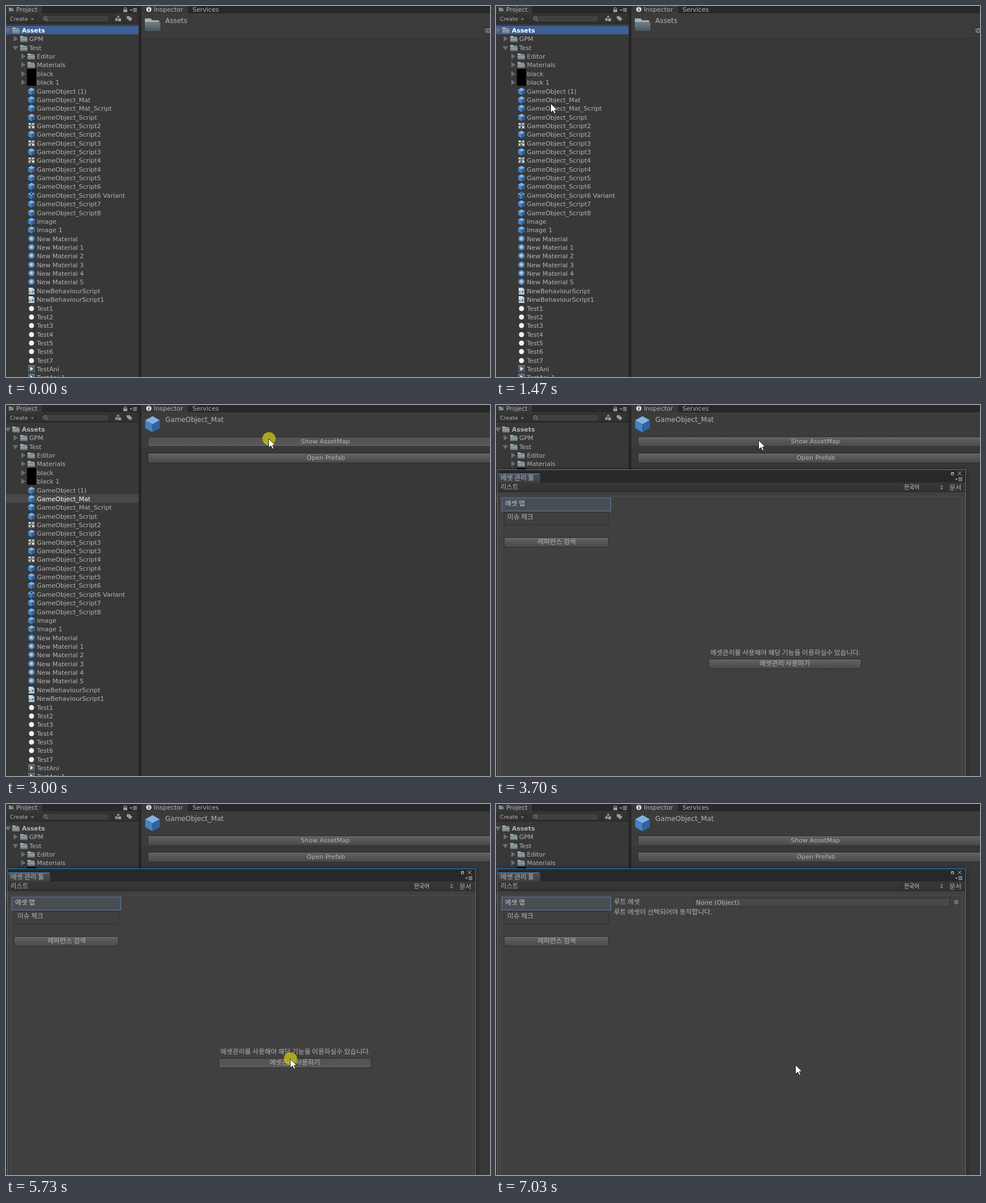
Animation, 854 px wide and 656 px high, one loop 7.49 s. Source, as an HTML page with a canvas:

```html
<!DOCTYPE html>
<html lang="ko">
<head>
<meta charset="utf-8">
<title>Asset window</title>
<style>
html, body { margin: 0; width: 100%; height: 100%; overflow: hidden; background: #383838; }
canvas { display: block; width: 854px; height: 656px; }
</style>
</head>
<body>
<canvas id="stage" width="854" height="656"></canvas>
<script>
const ctx = document.getElementById('stage').getContext('2d');
const LOOP = 7490;
const SANS = 'Verdana, "DejaVu Sans", sans-serif';
const KOREAN = '"Noto Sans CJK KR", "Noto Sans CJK", sans-serif';
const DIALOG = '"Open Sans", "Noto Sans", sans-serif';
const INK = '#b4b4b4';
const DIM = '#9a9a9a';
const ROW = 15.36;

function box(x, y, w, h, fill) {
  ctx.fillStyle = fill;
  ctx.fillRect(x, y, w, h);
}

function frame(x, y, w, h, color) {
  ctx.strokeStyle = color;
  ctx.lineWidth = 1;
  ctx.strokeRect(x + 0.5, y + 0.5, w - 1, h - 1);
}

function poly(points, fill, stroke) {
  ctx.beginPath();
  points.forEach(([x, y]) => ctx.lineTo(x, y));
  ctx.closePath();
  if (fill) { ctx.fillStyle = fill; ctx.fill(); }
  if (stroke) { ctx.strokeStyle = stroke; ctx.lineWidth = 1; ctx.stroke(); }
}

function disc(x, y, r, fill) {
  ctx.beginPath();
  ctx.arc(x, y, r, 0, 7);
  ctx.fillStyle = fill;
  ctx.fill();
}

function ring(x, y, r, color, width = 1) {
  ctx.beginPath();
  ctx.arc(x, y, r, 0, 7);
  ctx.strokeStyle = color;
  ctx.lineWidth = width;
  ctx.stroke();
}

function fade(y, h, top, bottom) {
  const g = ctx.createLinearGradient(0, y, 0, y + h);
  g.addColorStop(0, top);
  g.addColorStop(1, bottom);
  return g;
}

function label(str, x, y, { size = 11, font = SANS, color = INK, align = 'left', bold = false } = {}) {
  ctx.font = `${bold ? 'bold ' : ''}${size}px ${font}`;
  ctx.fillStyle = color;
  ctx.textAlign = align;
  ctx.fillText(str, x, y);
}

const korean = (str, x, y, opts = {}) => label(str, x, y, { size: 11.75, font: KOREAN, ...opts });

function roundBox(x, y, w, h, r, fill, stroke) {
  ctx.beginPath();
  ctx.roundRect(x + 0.5, y + 0.5, w - 1, h - 1, r);
  ctx.fillStyle = fill;
  ctx.fill();
  ctx.strokeStyle = stroke;
  ctx.lineWidth = 1;
  ctx.stroke();
}

function button(x, y, w, h, pressed) {
  roundBox(x, y, w, h, 2.5, pressed ? fade(y, h, '#515151', '#5a5a5a') : fade(y, h, '#646464', '#484848'), '#2b2b2b');
  if (!pressed) box(x + 2, y + 1, w - 4, 1, '#737373');
}

// Icons

function folder(x, y, s = 1, front = ['#a3adb1', '#6c7a80']) {
  poly([[x, y], [x + 5 * s, y], [x + 6 * s, y + 1.6 * s], [x + 12 * s, y + 1.6 * s], [x + 12 * s, y + 5 * s], [x, y + 5 * s]], '#a9b2b5');
  box(x, y + 3.2 * s, 13 * s, 7.3 * s, fade(y + 3 * s, 7.5 * s, ...front));
  box(x, y + 3.2 * s, 13 * s, 0.9, '#4d5a60');
}

function cube(cx, cy, s = 1) {
  const w = 6 * s, q = 3.2 * s, h = 6.6 * s;
  poly([[cx, cy - h], [cx + w, cy - q], [cx, cy], [cx - w, cy - q]], '#80b3e0');
  poly([[cx - w, cy - q], [cx, cy], [cx, cy + h], [cx - w, cy + q]], '#4583c2');
  poly([[cx + w, cy - q], [cx, cy], [cx, cy + h], [cx + w, cy + q]], '#2f639c');
}

function variant(cx, cy) {
  cube(cx, cy);
  poly([[cx - 3, cy - 5], [cx + 3, cy - 5], [cx, cy - 1]], '#29435c');
  box(cx - 5, cy, 2, 3, '#203b55');
  box(cx + 3, cy, 2, 3, '#203b55');
}

function graph(cx, cy) {
  box(cx - 6, cy - 6, 12, 12, '#4f585d');
  box(cx - 5, cy - 5, 4, 3, '#d2d8da');
  box(cx + 1, cy - 5, 4, 3, '#b4bcc0');
  box(cx - 5, cy, 3, 4, '#b8c0c4');
  box(cx + 1, cy, 4, 4, '#d2d8da');
  ctx.strokeStyle = '#cdd4d7';
  ctx.lineWidth = 1;
  ctx.beginPath();
  ctx.moveTo(cx - 4, cy + 3);
  ctx.lineTo(cx + 3, cy - 3);
  ctx.stroke();
}

function sphere(cx, cy) {
  const g = ctx.createRadialGradient(cx - 0.5, cy - 1, 0.5, cx, cy - 0.5, 6.6);
  g.addColorStop(0, '#cfdde8');
  g.addColorStop(0.4, '#8aabc8');
  g.addColorStop(0.75, '#426f9c');
  g.addColorStop(1, '#294a6e');
  disc(cx, cy - 0.5, 6.5, g);
}

function script(cx, cy) {
  poly([[cx - 5, cy - 6], [cx + 2, cy - 6], [cx + 5, cy - 3], [cx + 5, cy + 6], [cx - 5, cy + 6]], '#d5dcdf');
  poly([[cx + 2, cy - 6], [cx + 2, cy - 3], [cx + 5, cy - 3]], '#9aa7ae');
  label('c#', cx, cy + 4, { size: 7, color: '#2470a8', align: 'center', bold: true });
}

function clip(cx, cy) {
  box(cx - 6, cy - 7, 12, 13, fade(cy - 7, 13, '#627480', '#42525d'));
  poly([[cx - 2, cy - 4], [cx + 3, cy - 0.5], [cx - 2, cy + 3]], '#f0f4f5');
}

const icons = {
  cube, variant, graph, sphere, script, clip,
  scene: (cx, cy) => disc(cx, cy, 4.5, '#f2f2f2'),
  thumb: (cx, cy) => box(cx - 8, cy - 9, 16, 15, '#000')
};

function arrow(cx, cy, open) {
  poly(open ? [[cx - 5, cy - 3], [cx + 5, cy - 3], [cx, cy + 4.5]]
            : [[cx - 3, cy - 5], [cx + 4.5, cy], [cx - 3, cy + 5]], '#6d6d6d');
}

function menuMark(x, y) {
  poly([[x, y], [x + 5, y], [x + 2.5, y + 3]], DIM);
  for (let i = 0; i < 3; i++) box(x + 6, y - 2 + i * 2.5, 7, 1.2, INK);
}

// Project tree

const series = (icon, base, names) => names.split(',').map(n => ({ icon, name: base + n }));
const leaves = [
  ...series('thumb', 'black', ', 1'),
  ...series('cube', 'GameObject', ' (1),_Mat,_Mat_Script,_Script'),
  ...[2, 3, 4].flatMap(n => ['graph', 'cube'].map(icon => ({ icon, name: 'GameObject_Script' + n }))),
  ...series('cube', 'GameObject_Script', '5,6'),
  { icon: 'variant', name: 'GameObject_Script6 Variant' },
  ...series('cube', 'GameObject_Script', '7,8'),
  ...series('cube', 'Image', ', 1'),
  ...series('sphere', 'New Material', ', 1, 2, 3, 4, 5'),
  ...series('script', 'NewBehaviourScript', ',1'),
  ...series('scene', 'Test', '1,2,3,4,5,6,7'),
  ...series('clip', 'TestAni', ', 1')
];
const tree = [
  { name: 'Assets', depth: 0, open: true },
  { name: 'GPM', depth: 1 },
  { name: 'Test', depth: 1, open: true },
  { name: 'Editor', depth: 2 },
  { name: 'Materials', depth: 2 },
  ...leaves.map(leaf => ({ ...leaf, depth: 2 }))
];

function drawTree(picked, focused) {
  box(0, 31, 234, 625, '#383838');
  const top = Math.round(35 + picked * ROW);
  box(0, top, 234, 15, focused ? '#3e5f96' : '#484848');
  tree.forEach((item, i) => {
    const cy = Math.round(43 + i * ROW), d = item.depth;
    if (item.icon) icons[item.icon](45, cy);
    else folder([11, 25, 38][d], cy - 5);
    if (!item.icon || item.icon === 'thumb') arrow([3.5, 16.5, 30][d], cy, item.open);
    label(item.name, [28, 41, 54.5][d], cy + 4, { bold: d === 0, color: i === picked ? '#fff' : INK });
  });
}

function drawProjectBar() {
  box(0, 0, 854, 13, '#282828');
  box(0, 0, 64, 13, '#383838');
  box(64, 0, 1, 13, '#1f1f1f');
  folder(5, 3, 0.62);
  label('Project', 18, 10);
  box(207, 6, 7, 5, DIM);
  ctx.strokeStyle = DIM;
  ctx.lineWidth = 1.2;
  ctx.beginPath();
  ctx.arc(210.5, 5.5, 2.4, Math.PI, 0);
  ctx.stroke();
  menuMark(218, 6);

  box(0, 13, 234, 18, fade(13, 18, '#363636', '#303030'));
  box(0, 30, 234, 1, '#242424');
  label('Create', 7, 26, { size: 9.5 });
  poly([[44, 22], [49, 22], [46.5, 25]], '#8f8f8f');
  for (const x of [52, 187, 208, 231]) box(x, 14, 1, 16, '#272727');
  roundBox(62, 16, 120, 13, 6, '#404040', '#252525');
  ring(69.5, 21.5, 2.6, '#8f8f8f');
  poly([[71, 23], [74, 26], [73, 27]], '#8f8f8f');
  disc(195, 24, 2.5, DIM);
  box(198, 22, 5, 5, DIM);
  poly([[198, 16.5], [201, 20.5], [195, 20.5]], DIM);
  poly([[213, 18], [218, 18], [223, 23], [219, 27], [213, 22]], DIM);
}

function drawInspector(prefab, pressed) {
  box(234, 0, 5, 656, '#282828');
  box(236, 13, 1, 643, '#202020');
  box(239, 13, 615, 643, '#383838');
  box(239, 0, 82, 13, '#383838');
  box(321, 0, 1, 13, '#1f1f1f');
  disc(252, 6, 4.6, '#e4e4e4');
  box(251.2, 5, 1.7, 4, '#282828');
  box(251.2, 2.6, 1.7, 1.5, '#282828');
  label('Inspector', 261, 10);
  label('Services', 329, 10);

  box(239, 13, 615, prefab ? 63 : 43, '#3c3c3c');
  box(239, prefab ? 76 : 56, 615, 1, '#333');
  label(prefab ? 'GameObject_Mat' : 'Assets', 281, 30, { size: 12 });
  if (prefab) {
    cube(258.5, 34, 2.15);
    button(250, 56, 627, 18, pressed);
    label('Show AssetMap', 563.5, 68, { align: 'center' });
    button(250, 85, 627, 18);
    label('Open Prefab', 564.5, 97, { align: 'center' });
  } else {
    folder(245, 22, 2.1, ['#76858b', '#47545a']);
    roundBox(842, 37, 20, 13, 2, '#4b4b4b', '#222');
    ring(851, 43.5, 3.2, INK);
  }
}

// Tool window

function drawTool(focused, ready, pressed) {
  ctx.save();
  ctx.shadowColor = 'rgba(0,0,0,.45)';
  ctx.shadowBlur = focused ? 12 : 6;
  ctx.shadowOffsetY = 2;
  box(2, 114, 827, 560, '#404040');
  ctx.restore();
  box(3, 115, 825, 22, '#282828');
  poly([[4, 137], [4, 122], [75, 122], [78, 125], [78, 137]], fade(121, 16, '#4c5057', '#3e3e3e'));
  box(4, 121, 73, 1.5, '#4f7db5');
  korean('에셋 관리 툴', 8, 133);
  frame(803, 119, 5, 5, INK);
  box(803, 119, 5, 2, INK);
  ctx.strokeStyle = INK;
  ctx.beginPath();
  for (const s of [-3.5, 3.5]) {
    ctx.moveTo(818 - s, 117.5);
    ctx.lineTo(818 + s, 124.5);
  }
  ctx.stroke();
  menuMark(810, 130);

  box(3, 137, 825, 17, fade(137, 17, '#383838', '#313131'));
  box(3, 153, 825, 1, '#282828');
  korean('리스트', 8, 149, { size: 11.4 });
  for (const x of [715, 793]) box(x, 138, 1, 15, '#282828');
  korean('한국어', 720, 149, { size: 9.8, color: '#d0d0d0' });
  poly([[784, 144.5], [786.2, 141.5], [788.5, 144.5]], '#999');
  poly([[784, 146.5], [786.2, 149.5], [788.5, 146.5]], '#999');
  korean('문서', 800, 150, { size: 11.5 });

  frame(8, 161, 815, 510, '#4d4d4d');
  box(10, 164, 192, 23, '#494d54');
  frame(10, 164, 193, 24, '#5f7fae');
  korean('에셋 맵', 16, 178, { color: '#c8c8c8' });
  frame(14, 189, 185, 23, '#2f2f2f');
  korean('이슈 체크', 20, 202);
  button(14, 234, 185, 18);
  korean('레퍼런스 검색', 107, 246, { align: 'center' });

  if (ready) {
    korean('루트 에셋', 208, 177);
    box(350, 166, 451, 15, '#484848');
    frame(350, 166, 451, 16, '#303030');
    label('None (Object)', 353, 178);
    ring(812, 173.5, 3.2, INK);
    disc(812, 173.5, 1.1, INK);
    korean('루트 에셋이 선택되어야 동작합니다.', 208, 195);
  } else {
    korean('에셋관리를 사용해야 해당 기능을 이용하실수 있습니다.', 510.5, 442, { align: 'center' });
    button(375, 449, 270, 18, pressed);
    korean('에셋관리 사용하기', 509.5, 461, { align: 'center' });
  }
  frame(2, 114, 827, 560, focused ? '#1d83d8' : '#333');
}

function drawProgress(count) {
  ctx.save();
  ctx.shadowColor = 'rgba(0,0,0,.5)';
  ctx.shadowBlur = 12;
  ctx.shadowOffsetY = 3;
  box(243, 386, 344, 83, '#f0f0f0');
  ctx.restore();
  box(243, 386, 344, 29, '#fff');
  frame(243, 386, 344, 83, '#1883d7');
  label('DepotStewarding', 251, 405, { font: DIALOG, color: '#000' });
  box(254, 426, 322, 14, '#e6e6e6');
  box(255, 427, 320 * count / 714, 12, '#06b025');
  frame(254, 426, 322, 14, '#bcbcbc');
  label(`CacheAssetData(${count}/714)`, 253.5, 454, { size: 10.3, font: DIALOG, color: '#000' });
}

// Pointer: each move runs from start to end in a number of held steps

const moves = [
  { start: 520, end: 1220, steps: 10, path: [[185, 385], [195, 288], [300, 217], [215, 155], [97, 121]] },
  { start: 1290, end: 1470, steps: 3, path: [[97, 121], [97, 172]] },
  { start: 1590, end: 1591, steps: 1, path: [[97, 172], [97, 163]] },
  { start: 2140, end: 2870, steps: 10, path: [[97, 163], [260, 142], [415, 96], [464, 59]] },
  { start: 3700, end: 3790, steps: 2, path: [[464, 59], [463, 64]] },
  { start: 4070, end: 4580, steps: 7, path: [[463, 64], [497, 200], [545, 420], [575, 550], [585, 510]] },
  { start: 4620, end: 4770, steps: 3, path: [[585, 510], [526, 484]] },
  { start: 4860, end: 5400, steps: 8, path: [[526, 484], [424, 424], [440, 408], [502, 450]] },
  { start: 6910, end: 7030, steps: 3, path: [[502, 450], [529, 461]] }
];

function along(path, f) {
  const last = path.length - 1;
  const i = Math.min(Math.floor(f * last), last - 1), u = f * last - i;
  const at = n => path[Math.max(0, Math.min(last, n))];
  const [a, b, c, d] = [-1, 0, 1, 2].map(n => at(i + n));
  return [0, 1].map(k => b[k] + u / 2 * (c[k] - a[k]
    + u * (2 * a[k] - 5 * b[k] + 4 * c[k] - d[k] + u * (3 * (b[k] - c[k]) + d[k] - a[k]))));
}

function pointerAt(t) {
  const move = moves.filter(m => t >= m.start).pop();
  if (!move) return null;
  const u = Math.min(1, (t - move.start) / (move.end - move.start));
  const step = Math.floor(u * (move.steps - 1) + 1e-6) + 1;
  return along(move.path, step / move.steps).map(Math.round);
}

const shape = [[0, 0], [0, 16], [4, 12.5], [6.5, 18], [9, 17], [6.7, 11.5], [11.5, 11.5]];

function drawPointer([x, y], click, edge) {
  if (click) disc(x, y + 0.5, 11.6, 'rgba(190,184,25,.85)');
  poly(shape.map(([dx, dy]) => [x + dx - 0.5, y + dy + 0.5]), '#fff', edge);
}

const within = (t, a, b) => t >= a && t < b;

function draw(t) {
  const opened = t >= 3060;
  const busy = within(t, 5770, 6300);
  drawTree(t >= 1590 ? 8 : 0, t < 3000);
  drawProjectBar();
  drawInspector(t >= 1760, within(t, 3000, 3060));
  if (opened) drawTool(!busy, t >= 6210, within(t, 5730, 5770));
  if (busy) {
    const step = Math.min(5, Math.floor((t - 5770) / 88));
    drawProgress(Math.round(713 * (step + 1) / 6));
  }
  const tip = pointerAt(t);
  const click = within(t, 1590, 1680) || within(t, 3000, 3060) || within(t, 5730, 5770);
  if (tip) drawPointer(tip, click, busy ? '#0c9a36' : '#2a2a2a');
}

const begin = performance.now();
function tick() {
  draw((performance.now() - begin) % LOOP);
  requestAnimationFrame(tick);
}
tick();
</script>
</body>
</html>
```
